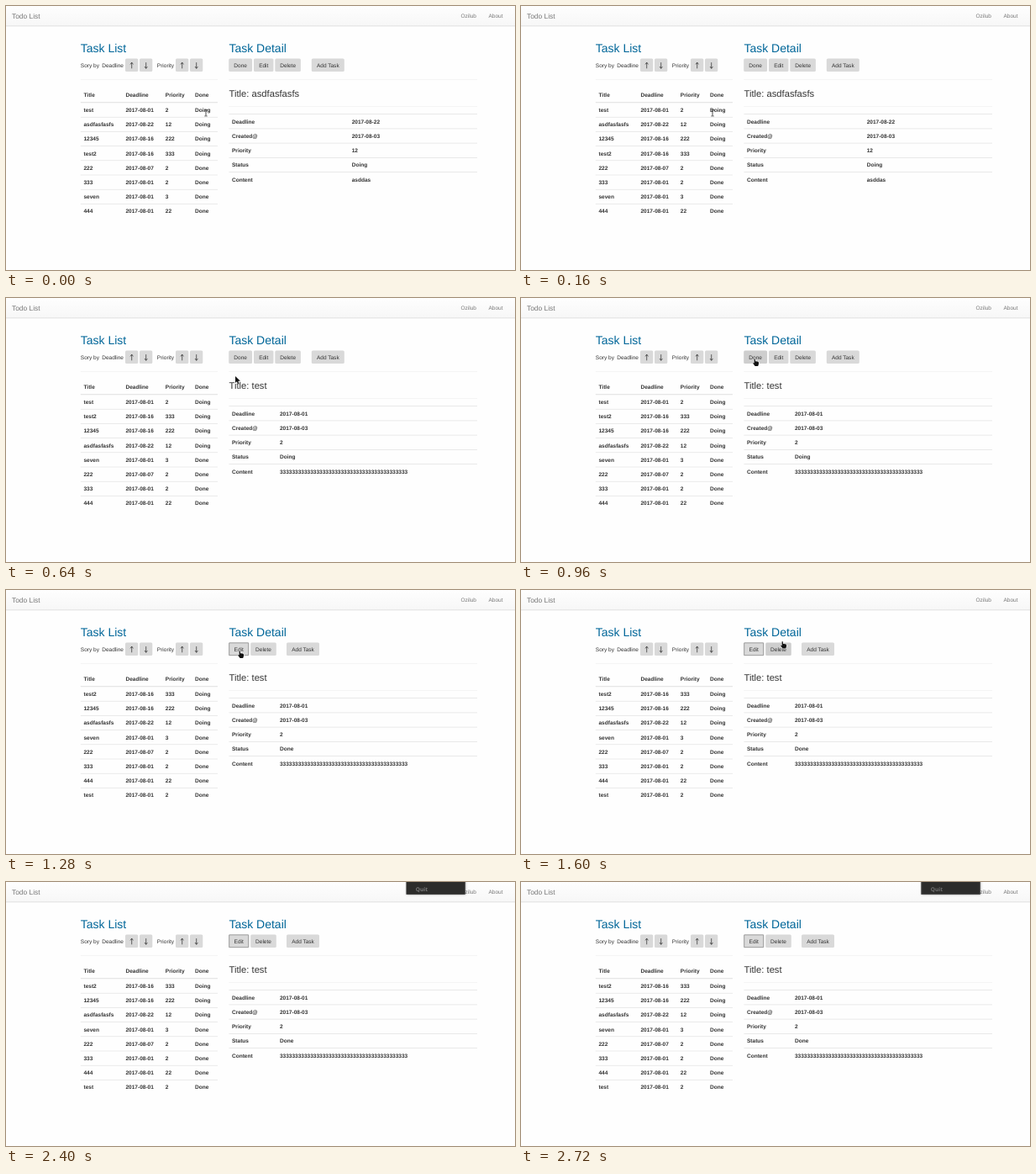
Animation of 606x314 px, one loop 3040 ms. Source, as an HTML page with a canvas:

```html
<!DOCTYPE html>
<html lang="en">
<head>
<meta charset="utf-8">
<title>Todo List</title>
<style>
html, body { margin: 0; width: 100%; height: 100%; overflow: hidden; background: #fefefe; }
canvas { display: block; width: 606px; height: 314px; }
</style>
</head>
<body>
<canvas id="stage"></canvas>
<script>
const W = 606, H = 314, LOOP = 3040;
const BODY = 6.53, ROW = 17.2;
const SANS = '"Liberation Sans", Arial, sans-serif';
const canvas = document.getElementById('stage');
const ctx = canvas.getContext('2d');
const ratio = window.devicePixelRatio || 1;
canvas.width = W * ratio;
canvas.height = H * ratio;
ctx.scale(ratio, ratio);
ctx.textRendering = 'geometricPrecision';

const tasks = {
  test: ['2017-08-01', '2', 'Doing'],
  asdfasfasfs: ['2017-08-22', '12', 'Doing'],
  12345: ['2017-08-16', '222', 'Doing'],
  test2: ['2017-08-16', '333', 'Doing'],
  222: ['2017-08-07', '2', 'Done'],
  333: ['2017-08-01', '2', 'Done'],
  seven: ['2017-08-01', '3', 'Done'],
  444: ['2017-08-01', '22', 'Done']
};
const orders = [
  'test asdfasfasfs 12345 test2 222 333 seven 444',
  'test test2 12345 asdfasfasfs seven 222 333 444',
  'test2 12345 asdfasfasfs seven 222 333 444 test'
].map(s => s.split(' '));

// Pointer stops: start time, shape, x, y
const pointer = [
  [0, beam, 238, 127.3],
  [160, beam, 228, 127.3],
  [480, beam, 240.5, 123],
  [640, arrow, 273, 93],
  [800, hand, 275.5, 74],
  [960, hand, 276, 72.3],
  [1600, hand, 309, 61],
  [1760, arrow, 401.5, 21.5],
  [1920, null, 0, 0]
];

function text(str, x, mid, size = BODY, color = '#333', weight = 'normal', family = SANS) {
  ctx.font = `${weight} ${size}px ${family}`;
  ctx.fillStyle = color;
  ctx.fillText(str, x, mid + size * 0.36);
}

const bold = (str, x, mid) => text(str, x, mid, BODY, '#333', 'bold');

function rect(x, y, w, h, color) {
  ctx.fillStyle = color;
  ctx.fillRect(x, y, w, h);
}

const rule = (x1, x2, y, color = '#ddd', h = 0.6) => rect(x1, y, x2 - x1, h, color);

function box(x, w, color = '#d9d9d9') {
  ctx.fillStyle = color;
  ctx.beginPath();
  ctx.roundRect(x, 62.5, w, 15.6, 1.6);
  ctx.fill();
}

function button(label, x, w, state) {
  box(x, w, state === 'hover' ? '#cecece' : '#d9d9d9');
  if (state === 'focus') {
    ctx.strokeStyle = '#8d8d8d';
    ctx.lineWidth = 0.8;
    ctx.strokeRect(x + 0.5, 62.9, w - 1, 14.8);
  }
  ctx.textAlign = 'center';
  text(label, x + w / 2, 70.3);
  ctx.textAlign = 'left';
}

function sortButton(x, dir) {
  box(x, 15.3);
  const cx = x + 7.7, tip = 70.7 - 3.6 * dir;
  ctx.strokeStyle = '#333';
  ctx.lineWidth = 0.75;
  ctx.beginPath();
  ctx.moveTo(cx, tip + 7.2 * dir);
  ctx.lineTo(cx, tip);
  ctx.moveTo(cx - 1.7, tip + 2.3 * dir);
  ctx.lineTo(cx, tip);
  ctx.lineTo(cx + 1.7, tip + 2.3 * dir);
  ctx.stroke();
}

function shape(points, x, y) {
  ctx.beginPath();
  points.forEach(([px, py]) => ctx.lineTo(x + px, y + py));
  ctx.closePath();
  ctx.lineJoin = 'round';
  ctx.lineWidth = 0.9;
  ctx.strokeStyle = '#fff';
  ctx.stroke();
  ctx.fillStyle = '#111';
  ctx.fill();
}

function beam(x, y) {
  rect(x - 0.4, y - 3.6, 0.8, 7.2, '#222');
  rect(x - 1.8, y - 4, 3.6, 0.7, '#444');
  rect(x - 1.8, y + 3.3, 3.6, 0.7, '#444');
}

function arrow(x, y) {
  shape([[0, 0], [0, 8], [1.9, 6.3], [3.1, 9.2], [4.5, 8.6], [3.3, 5.8], [5.9, 5.8]], x, y);
}

function hand(x, y) {
  shape([[1.6, 0.3], [2.8, 0.3], [3, 3], [5.6, 3.3], [7, 4.1], [7, 6.2],
    [6.2, 8.6], [2.6, 8.6], [0.2, 5.4], [0.6, 4.6], [1.6, 5.2]], x, y);
}

function navbar() {
  const fade = ctx.createLinearGradient(0, 0, 0, 23.5);
  fade.addColorStop(0, '#fefefe');
  fade.addColorStop(1, '#f7f7f7');
  rect(0, 0, W, 23.3, fade);
  rect(0, 23.3, W, 0.7, '#dfdfdf');
  rect(0, 24, W, 1, '#f6f6f6');
  text('Todo List', 7, 11.9, 8.4, '#777');
  text('Ozilub', 541.5, 12, BODY, '#777');
  text('About', 574.5, 12, BODY, '#777');
}

function taskList(order, finished) {
  text('Task List', 88.8, 50.2, 14, '#069');
  text('Sory by', 88.8, 70.2);
  text('Deadline', 114.2, 70.2);
  sortButton(142, 1);
  sortButton(159, -1);
  text('Priority', 179.8, 70.2);
  sortButton(202, 1);
  sortButton(219, -1);
  rule(88.8, 252, 87.3, '#eee');

  const cols = [92.5, 142.5, 189.8, 225];
  const line = (cells, y) => cells.forEach((c, i) => bold(c, cols[i], y));
  line(['Title', 'Deadline', 'Priority', 'Done'], 105.6);
  rule(88.8, 252, 114.3, '#ddd', 0.95);
  order.forEach((name, i) => {
    const [date, rank, status] = tasks[name];
    const done = finished && name === 'test' ? 'Done' : status;
    line([name, date, rank, done], 123.6 + i * ROW);
    if (i) rule(88.8, 252, 114.7 + i * ROW);
  });
}

function taskDetail(name, finished, t) {
  text('Task Detail', 265.4, 50.2, 14, '#069');
  if (finished) {
    button('Edit', 265.2, 24, 'focus');
    button('Delete', 291.2, 30.6, t >= 1600 && t < 1760 ? 'hover' : '');
    button('Add Task', 334, 39);
  } else {
    button('Done', 265.2, 27.9, t >= 800 ? 'hover' : '');
    button('Edit', 295, 23.5);
    button('Delete', 320.3, 30.6);
    button('Add Task', 363.8, 39);
  }
  rule(265.4, 561, 87.3, '#eee');
  text('Title: ' + name, 265.6, 103.5, 11.2);
  rule(265.4, 561, 119.2, '#eee');

  const [date, rank, status] = tasks[name];
  const isTest = name === 'test';
  [
    ['Deadline', date],
    ['Created@', '2017-08-03'],
    ['Priority', rank],
    ['Status', finished ? 'Done' : status],
    ['Content', isTest ? '3'.repeat(42) : 'asddas']
  ].forEach(([label, value], i) => {
    const y = 137.5 + i * ROW;
    rule(265.4, 561, y - 9.1);
    bold(label, 269, y);
    bold(value, isTest ? 326 : 411.7, y);
  });
}

function menu(settled) {
  ctx.save();
  ctx.shadowColor = 'rgba(0,0,0,.45)';
  ctx.shadowBlur = 2.5 * ratio;
  ctx.shadowOffsetY = 0.6 * ratio;
  rect(476.5, -3, 70.2, 17.8, '#2c2c2b');
  ctx.restore();
  if (settled) {
    ctx.strokeStyle = '#555';
    ctx.lineWidth = 0.6;
    ctx.strokeRect(476.8, -1, 69.6, 15.4);
  }
  text('Quit', 487.8, 8.7, 6.5, settled ? '#727272' : '#7b7b7b', 'bold', '"Noto Sans", sans-serif');
}

function draw(t) {
  const sorted = t >= 320, finished = t >= 1280;
  rect(0, 0, W, H, '#fefefe');
  navbar();
  taskList(orders[sorted + finished], finished);
  taskDetail(sorted ? 'test' : 'asdfasfasfs', finished, t);
  if (t >= 2400) menu(t >= 2720);
  const [, cursor, x, y] = pointer.findLast(p => t >= p[0]);
  if (cursor) cursor(x, y);
}

const start = performance.now();
function tick() {
  draw((performance.now() - start) % LOOP);
  requestAnimationFrame(tick);
}
tick();
</script>
</body>
</html>
```
